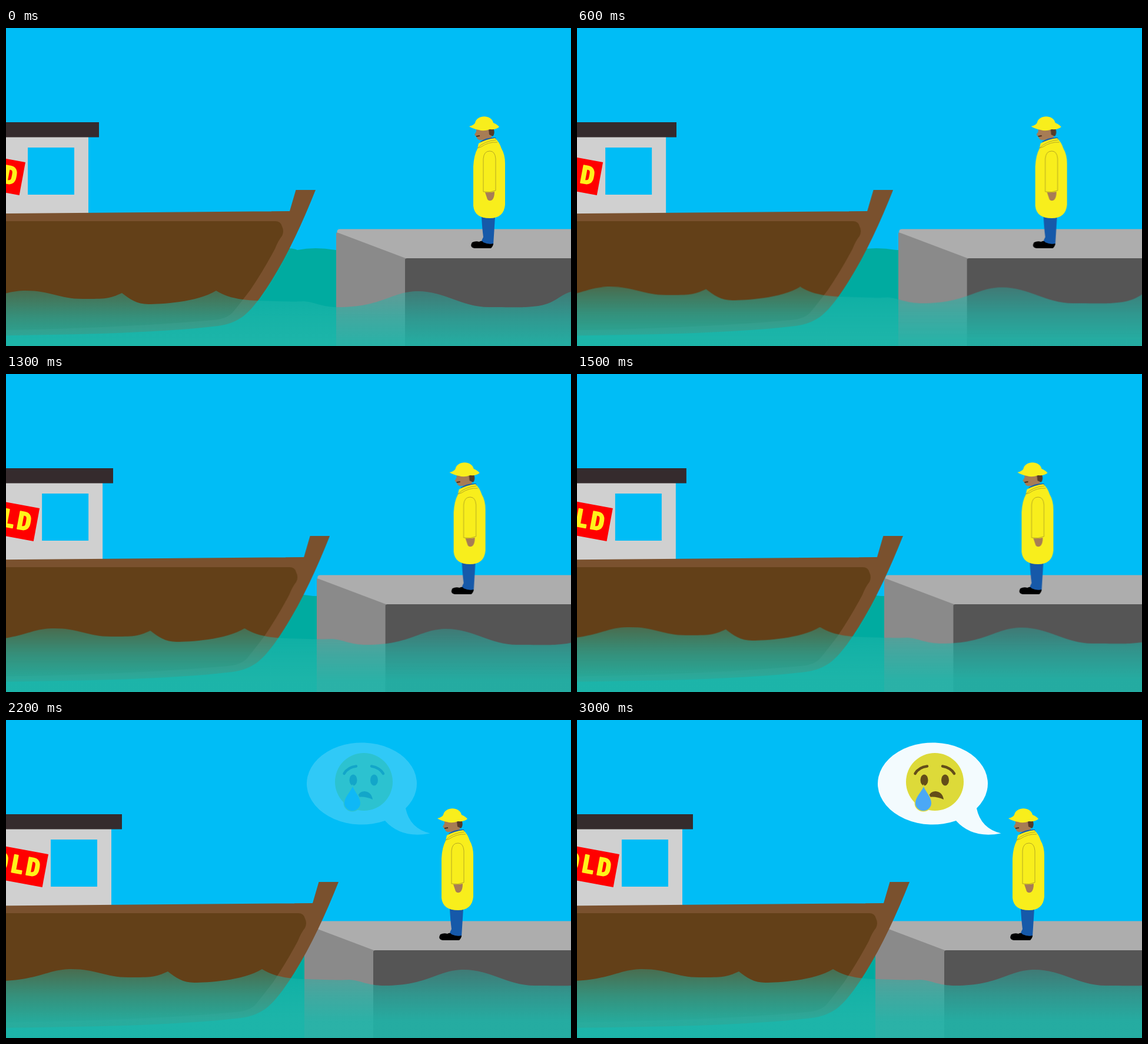
An HTML page for the animation above (6 s loop, 960x540 px).

```html
<!DOCTYPE html>
<html lang="en">
<head>
<meta charset="utf-8">
<title>Boat at the dock</title>
<style>
:root { --sky: #00bdf6; --wood: #7a512e; --coat: #f8ee1c; --skin: #a77c55; --face: #e8dc30; --ink: #68480f; }
html, body { margin: 0; width: 100%; height: 100%; overflow: hidden; background: var(--sky); }
svg { display: block; width: 960px; height: 540px; }

/* Everything glides in 21 even steps, then rests. */
.glide { animation: glide 6s infinite; }
#boat { --to: 39px, 0px; }
#dock { --to: -54px, 0px; }
#back { --to: -62px, 0px; }
#sea { --to: 78px, -23px; }
#bubble { animation: appear 6s infinite; }
@keyframes glide {
  0% { transform: translate(0, 0); animation-timing-function: steps(21); }
  35%, 100% { transform: translate(var(--to)); }
}
@keyframes appear {
  0% { opacity: 0; }
  33.3333% { opacity: 0; animation-timing-function: steps(10); }
  50%, 100% { opacity: .955; }
}

.sky { fill: var(--sky); }
.wood { fill: var(--wood); }
.coat { fill: var(--coat); }
.skin { fill: var(--skin); }
.seam { fill: none; stroke: #b5a822; }
.ink { fill: var(--ink); }
.brow { fill: none; stroke: var(--ink); stroke-width: 4.5; stroke-linecap: round; }
.tear { fill: #4fa8f7; stroke: var(--face); stroke-width: 3; paint-order: stroke; }
.sold {
  font: 700 42px "Roboto Condensed", "Noto Sans", sans-serif;
  font-stretch: 75%;
  text-anchor: middle;
  fill: #fff21a;
  stroke: #fff21a;
  stroke-width: 2;
  stroke-linejoin: round;
}
</style>
</head>
<body>
<svg viewBox="0 0 960 540">
  <defs>
    <linearGradient id="water" gradientUnits="userSpaceOnUse" x1="0" y1="446" x2="0" y2="535">
      <stop offset="0" stop-color="#20b6aa" stop-opacity=".38"/>
      <stop offset=".5" stop-color="#20b6aa" stop-opacity=".68"/>
      <stop offset="1" stop-color="#20b6aa" stop-opacity=".9"/>
    </linearGradient>
  </defs>
  <rect class="sky" width="960" height="540"/>

  <path id="back" class="glide" fill="#00aba0" d="M-20 376 H440 Q484 371 495 377 Q525 371 560 377 H1040 V545 H-20Z"/>

  <g id="dock" class="glide">
    <path fill="#adadad" d="M567 341.500 H1030 V395 H678 L563 349 Q561 341.500 567 341.500Z"/>
    <path fill="#8a8a8a" d="M561 348 Q562 347 565 348 L679 391 V545 H561Z"/>
    <path fill="#555" d="M678 394 Q678 391 681 391 H1030 V545 H678Z"/>

    <g id="man">
      <path fill="#1659a9" d="M808 320 H831 L828 368 H808 Q806 364 811 355 Q809 340 808 320Z"/>
      <path d="M792 364 Q798 361 804 363 Q809 360 811 364 Q820 368 828 366 Q828 370 824 374 H796 Q787 372 792 364Z"/>
      <path class="skin" d="M799 171 H825 V190 H808 Q801 191 800 186 L796 181 L799 176Z"/>
      <path fill="#553b28" d="M820 172 H829 Q831 180 827 184 L821 181Z"/>
      <path stroke="#4a2d1c" stroke-width="2" d="M799 184 L805 183"/>
      <path fill="#1a5ca8" d="M806 193 Q816 185 832 186 L833 191 L808 198Z"/>
      <path class="coat" d="M803 196 Q815 189 831 187 Q838 193 842 205 Q848 215 848 230 V300 Q846 323 822 323 Q796 323 794 302 V235 Q795 216 801 205Z"/>
      <path class="coat" d="M787 167 Q795 165 797 161 C800 146.500 825 146.500 828 161 Q835 164 838 168 Q833 173 822 172 Q812 176 803 173 Q793 171 787 167Z"/>
      <path class="seam" d="M801 204 Q812 192 833 190 M801 204 L807 202 Q820 193 835 194"/>
      <path class="seam" d="M811 278 V222 Q812 209 822 209 Q831 209 832 222 V276 Q822 280 811 278Z"/>
      <path class="skin" d="M814 279 Q822 280 830 278 Q830 288 826 292 Q821 295 818 291Z"/>
    </g>
  </g>

  <g id="boat" class="glide">
    <rect x="-60" y="185" width="200" height="131" fill="#d0d0d0"/>
    <rect class="sky" x="37" y="203" width="79" height="80"/>
    <rect x="-60" y="160" width="218" height="25.500" fill="#352b2d"/>
    <g transform="translate(33 228) rotate(10.5)">
      <rect x="-150" width="150" height="57" fill="#f00"/>
      <text class="sold" x="-104 -77 -48.500 -21.500" y="41">SOLD</text>
    </g>
    <path class="wood" d="M-60 315.500 L482 311 L492.500 275 H526 C500 340 470 405 431 459 C410 487 395 501 360 506 C250 519 100 521 -60 523Z"/>
    <path fill="#634018" d="M-60 328 H457 Q467 328 469 337 Q473 345 469 353 Q462 362 457 375 Q438 411 415 445 Q399 466 386 482 Q376 494 352 496 Q180 511 -60 514Z"/>
  </g>

  <path id="sea" class="glide" fill="url(#water)" d="M-110 467 C-20 467 -10 446 33 446 S90 460 130 460 S175 460 197 450
    C210 460 222 469 242 469 S325 466 357 446 C375 457 395 462 430 463 S490 465 505 464
    C525 465 535 474 565 474 C640 474 655 447 700 447 S775 474 820 474 S880 475 895 473
    C940 470 940 446 975 446 V600 H-110Z"/>

  <g id="bubble">
    <path fill="#fff" d="M679 150 A93.500 69.500 0 1 0 644 171 Q672 202 720.500 192.500 Q686 184 679 150Z"/>
    <circle cx="608" cy="105" r="49" fill="var(--face)"/>
    <ellipse class="ink" cx="590" cy="102" rx="6.500" ry="9.500"/>
    <ellipse class="ink" cx="625.500" cy="102" rx="6.500" ry="9.500"/>
    <path class="ink" d="M597 131 Q600 121 609 121 Q621 122 623 135 Q610 129 597 131Z"/>
    <path class="brow" d="M574.500 91 Q581 80 595 78.500 M621 78.500 Q635 81 641 91"/>
    <path class="tear" d="M589 113 C592 121 602 131 602 141 A13.500 13 0 0 1 575 141 C575 131 586 121 589 113Z"/>
  </g>
</svg>
</body>
</html>
```
